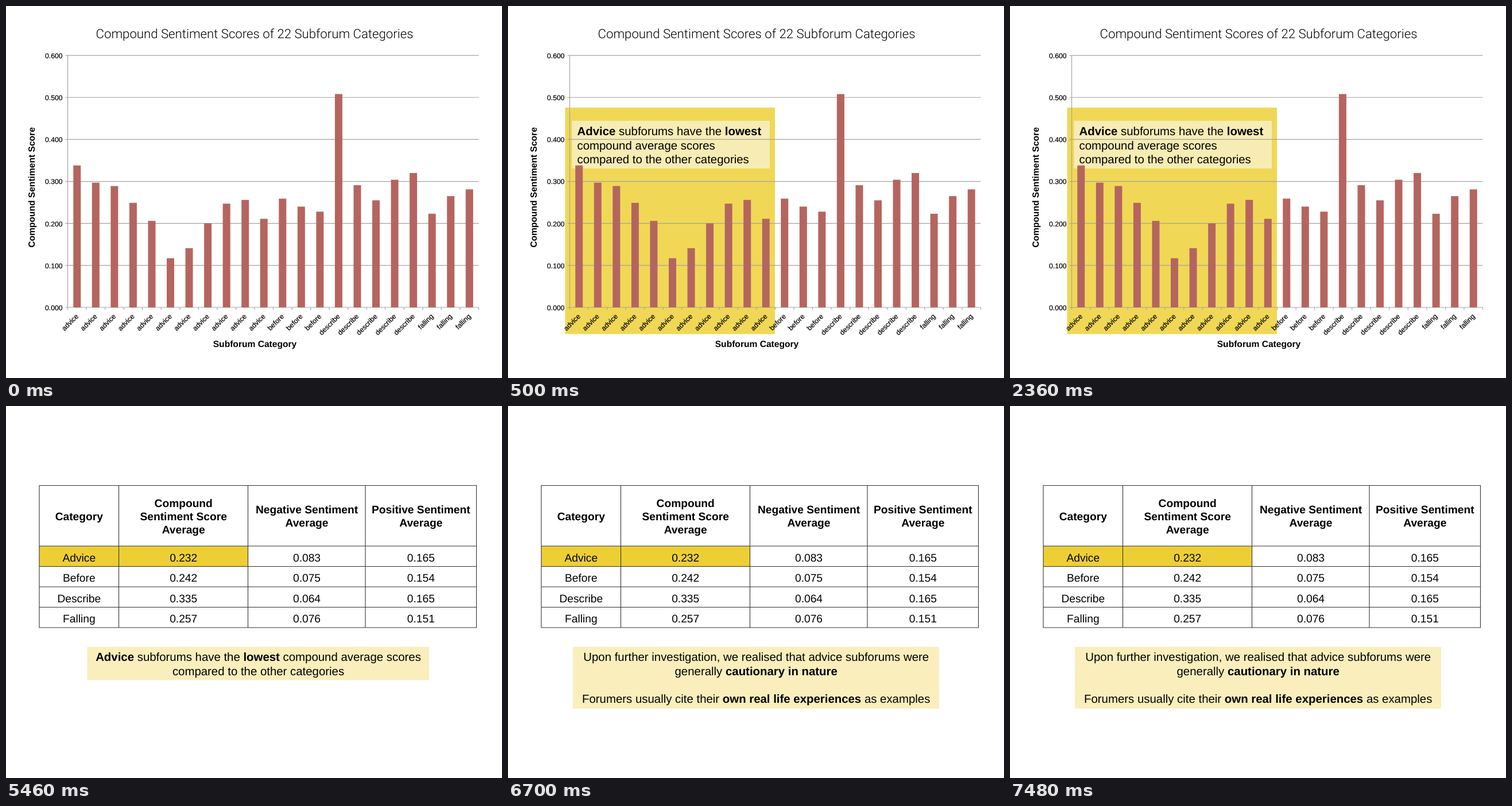
An HTML page for the animation above (8 s loop, 864 by 648 pixels).

```html
<!DOCTYPE html>
<html lang="en">
<head>
<meta charset="utf-8">
<title>Sentiment scores</title>
<style>
  html, body { margin: 0; width: 100%; height: 100%; overflow: hidden; background: #fff; }
  svg { display: block; width: 864px; height: 648px; }
  text { font-family: "Liberation Sans", Arial, sans-serif; fill: #000; text-rendering: geometricPrecision; }
  .title { font: 300 22.2px Roboto, "Open Sans", sans-serif; }
  .axis { font-size: 15.6px; font-weight: bold; }
  .tick { font-size: 12.2px; stroke: #000; stroke-width: .2px; }
  .note { font-size: 20.4px; }
  .cell { font-size: 19.2px; }
  .head { font-size: 19.2px; font-weight: bold; }
  .bold { font-weight: bold; }
  .grid { stroke: #a3a3a3; stroke-width: 1.2; fill: none; }
  .rule { stroke: #333; stroke-width: 1.1; fill: none; }
</style>
</head>
<body>
<svg id="stage" viewBox="0 0 864 648"></svg>
<script>
const LOOP = 8000;
const stage = document.getElementById('stage');

// Words between asterisks are set in bold.
const rich = s => s.replace(/\*(.+?)\*/g, '<tspan class="bold">$1</tspan>');
const text = (x, y, s, cls, anchor = 'middle', extra = '') =>
  `<text x="${x}" y="${y}" class="${cls}" text-anchor="${anchor}" ${extra}>${rich(s)}</text>`;
const rect = (x1, y1, x2, y2, fill) =>
  `<rect x="${x1}" y="${y1}" width="${x2 - x1}" height="${y2 - y1}" fill="${fill}"/>`;
const path = (d, cls) => `<path d="${d}" class="${cls}"/>`;
const group = (id, body) => `<g id="${id}">${body}</g>`;

const NOTE = '#f9eebc';

function chart() {
  const left = 107.5, right = 823.5, base = 525, unit = 731.5;
  const scores = [.338, .297, .289, .249, .206, .117, .141, .2, .247, .256, .211,
    .259, .24, .228, .508, .291, .255, .304, .32, .223, .265, .281];
  const name = i => i < 11 ? 'advice' : i < 14 ? 'before' : i < 19 ? 'describe' : 'falling';
  const step = (right - left) / scores.length;
  let lines = `M${left} 86V${base}`, bars = '', labels = '';

  for (let i = 0; i <= 6; i++) {
    const y = base - i * unit / 10;
    lines += `M${left - 4} ${y}H${right}`;
    labels += text(98.5, y + 4.8, (i / 10).toFixed(3), 'tick', 'end');
  }
  for (let i = 0; i <= scores.length; i++) lines += `M${left + i * step} ${base}v4`;
  scores.forEach((v, i) => {
    const x = left + (i + .5) * step;
    bars += rect(x - 6.5, base - v * unit, x + 6.5, base, '#b5655f');
    labels += text(0, 0, name(i), 'tick', 'end', `transform="translate(${x + 3.2} 541.5) rotate(-45)"`);
  });

  return path(lines, 'grid') + bars + labels +
    text(433, 55.5, 'Compound Sentiment Scores of 22 Subforum Categories', 'title') +
    text(433.5, 593.5, 'Subforum Category', 'axis') +
    text(0, 0, 'Compound Sentiment Score', 'axis', 'middle', 'transform="translate(49.5 316) rotate(-90)"');
}

function table() {
  const xs = [58, 196.5, 421.5, 626, 819.5];
  const ys = [138.5, 244, 279.5, 315, 350.5, 386];
  const mids = [127.3, 309.2, 524, 722.8];
  const heads = [['Category'], ['Compound', 'Sentiment Score', 'Average'],
    ['Negative Sentiment', 'Average'], ['Positive Sentiment', 'Average']];
  const rows = [
    ['Advice', '0.232', '0.083', '0.165'],
    ['Before', '0.242', '0.075', '0.154'],
    ['Describe', '0.335', '0.064', '0.165'],
    ['Falling', '0.257', '0.076', '0.151']];
  let out = rect(58, 244, 421.5, 279.5, '#edcf35');
  out += path(xs.map(x => `M${x} 138V386.5`).join('') + ys.map(y => `M57.5 ${y}H820`).join(''), 'rule');
  heads.forEach((set, c) => set.forEach((s, i) => {
    out += text(mids[c], 198.7 + (i - (set.length - 1) / 2) * 22.9, s, 'head');
  }));
  rows.forEach((row, r) => row.forEach((s, c) => {
    out += text(mids[c], 270.6 + r * 35.5, s, 'cell');
  }));
  return out;
}

const notes = (x, y, list, anchor) =>
  list.map((s, i) => text(x, y + i * 24.2, s, 'note', anchor)).join('');

stage.innerHTML =
  group('chart',
    group('glow', rect(99.5, 177, 465, 571.5, '#f0d856') + rect(111.5, 200, 456, 283, '#f7ecb4')) +
    chart() +
    group('remark', notes(120.5, 225.3, ['*Advice* subforums have the *lowest*',
      'compound average scores', 'compared to the other categories'], 'start'))) +
  group('table',
    table() +
    group('lowest', rect(141.5, 419.5, 737, 477.5, NOTE) +
      notes(439.5, 444.3, ['*Advice* subforums have the *lowest* compound average scores',
        'compared to the other categories'])) +
    group('nature', rect(113, 419.5, 751, 527, NOTE) +
      notes(432.2, 444.3, ['Upon further investigation, we realised that advice subforums were',
        'generally *cautionary in nature*', '',
        'Forumers usually cite their *own real life experiences* as examples'])));

const show = (id, on) => {
  document.getElementById(id).style.display = on ? '' : 'none';
};

function draw(t) {
  show('chart', t < 3600);
  show('glow', t >= 500);
  show('remark', t >= 500);
  show('table', t >= 3600);
  show('lowest', t < 6700);
  show('nature', t >= 6700);
}

const start = performance.now();
function tick() {
  draw((performance.now() - start) % LOOP);
  requestAnimationFrame(tick);
}
tick();
</script>
</body>
</html>
```
